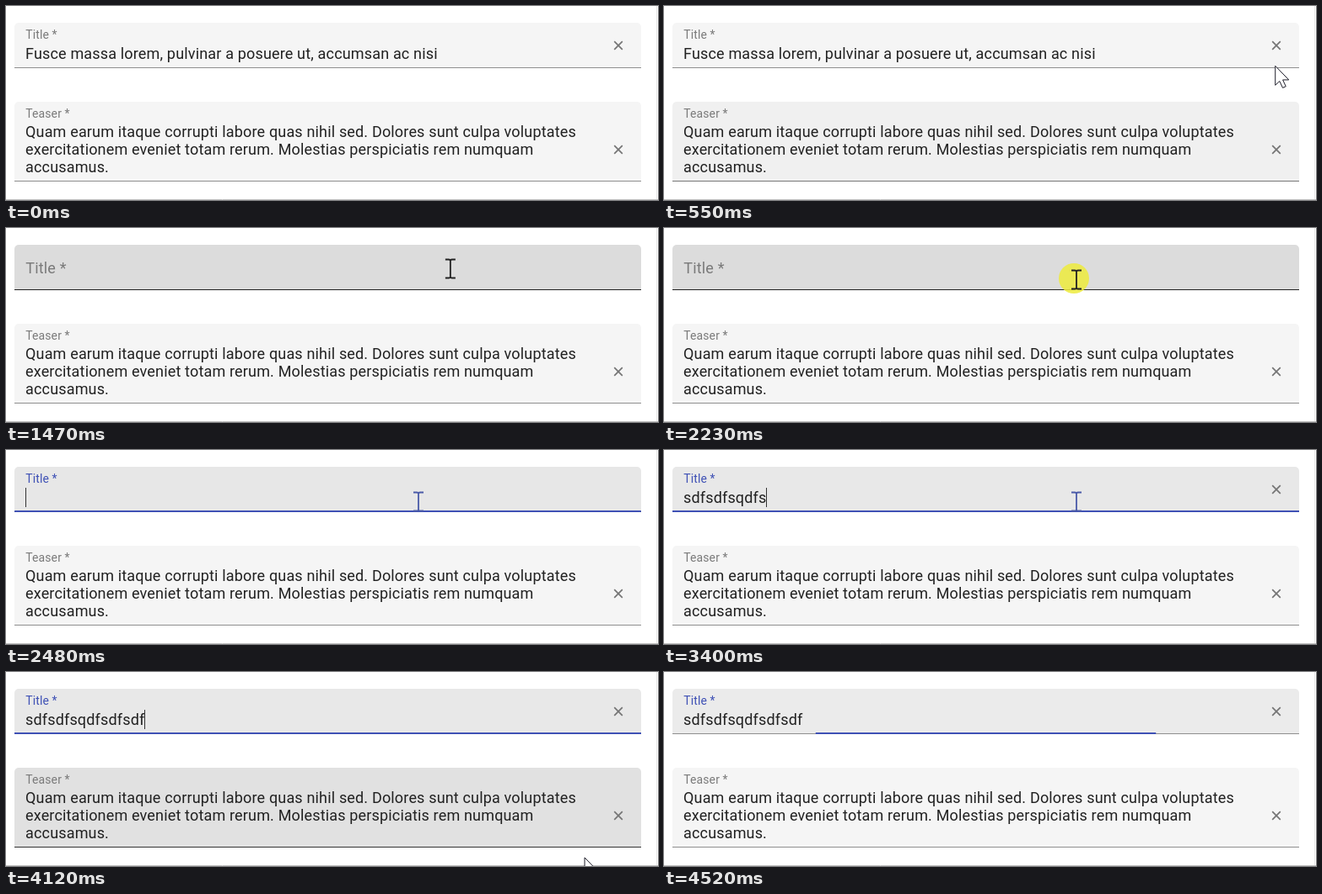
Animation of 773 by 231 pixels, one loop 4570 ms. Source, as an HTML page:

```html
<!DOCTYPE html>
<html lang="en">
<head>
<meta charset="utf-8">
<title>Form fields</title>
<style>
  html, body { margin: 0; width: 100%; height: 100%; overflow: hidden; background: #fff; }
  svg { display: block; }
  text { font: 18px Roboto, sans-serif; letter-spacing: .165px; fill: #212121; white-space: pre; }
  .label { fill: #7a7a7a; }
  .clear { stroke: #757575; stroke-width: 1.7; fill: none; }
</style>
</head>
<body>
<svg width="773" height="231" viewBox="0 0 773 231">
  <path d="M771.5 0V230" stroke="#e6e6e6"/>
  <path d="M0 230.5H773" stroke="#c2c2c2"/>

  <path id="titleBox" d="M10 74V25a5 5 0 0 1 5-5H748a5 5 0 0 1 5 5V74Z"/>
  <rect id="titleLine" x="10" y="73" width="743" height="1"/>
  <rect id="ripple" y="72" height="2" fill="#3f51b5"/>
  <text id="titleLabel" class="label">Title *</text>
  <text id="value" x="23" y="63"></text>
  <rect id="caret" y="45" width="1" height="23" fill="#333"/>
  <path id="clear" class="clear" d="M721.2 42.2l9.6 9.6m0-9.6l-9.6 9.6"/>

  <path id="teaserBox" d="M10 209V119a5 5 0 0 1 5-5H748a5 5 0 0 1 5 5V209Z"/>
  <rect id="teaserLine" x="10" y="208" width="743" height="1"/>
  <text class="label" transform="translate(23.3 133) scale(.775)">Teaser *</text>
  <text x="23" y="156">Quam earum itaque corrupti labore quas nihil sed. Dolores sunt culpa voluptates</text>
  <text x="23" y="177">exercitationem eveniet totam rerum. Molestias perspiciatis rem numquam</text>
  <text x="23" y="198">accusamus.</text>
  <path class="clear" d="M721.2 166.2l9.6 9.6m0-9.6l-9.6 9.6"/>

  <g id="pointer">
    <circle id="halo" cx="-3" cy="-1" r="18" fill="#eeeb3c" opacity=".85"/>
    <path id="arrow" d="M.5 .5V23.5L5.6 18.7L9.3 26.6L13 24.9L9.4 17.1H16.5Z" fill="#fff" stroke="#1c1c28"/>
    <path id="hand" d="M-2 13V2a2 2 0 0 1 4 0V8q2-1.6 3.5 .4q2-1.2 3.2 .6q2.3-.6 2.3 2V15q0 4-2.5 7H-1.5q-1.5-4-4.5-7.5q-.5-3 2-2.5Z" fill="#fff" stroke="#1c1c28"/>
    <path id="beam" d="M-6 -10.5H-2Q0 -10.5 0 -9Q0 -10.5 2 -10.5H6M0 -9V10M-6 11.5H-2Q0 11.5 0 10Q0 11.5 2 11.5H6" fill="none" stroke-width="1.8"/>
  </g>
</svg>
<script>
const LOOP = 4570, CLEARED = 1120, CLICK = 2230, FOCUS = 2255, BLUR = 4440;
const $ = id => document.getElementById(id);
const set = (id, attrs) => { for (const k in attrs) $(id).setAttribute(k, attrs[k]); };
const show = (id, on) => set(id, { visibility: on ? 'visible' : 'hidden' });
const prog = (t, start, dur) => Math.min(1, Math.max(0, (t - start) / dur));
const ease = (p, n) => 1 - (1 - p) ** n;
const mix = (a, b, p) => a + (b - a) * p;
const gray = v => `rgb(${v},${v},${v})`;
const fade = (t, on, off) =>
  ease(prog(t, on, 240), 2) * (1 - ease(prog(t, off, 240), 2));

const filled = 'Fusce massa lorem, pulvinar a posuere ut, accumsan ac nisi';
const typed = 'sdfsdfsqdfsdfsdf';

// One burst of keystrokes, 40 ms apart
const burst = (t, start, size) =>
  t < start ? 0 : Math.min(size, 1 + Math.floor((t - start) / 40));
const typedCount = t => burst(t, 2790, 6) + burst(t, 3140, 4) + burst(t, 3400, 6);

// The pointer comes to the clear button, goes to the text, clicks, then leaves
function pointerAt(t) {
  const enter = ease(prog(t, 230, 490), 2);
  const toText = ease(prog(t, 1200, 300), 2);
  const settle = prog(t, 1700, 330);
  const leave = prog(t, 3650, 520) ** 1.5;
  return [
    726 - 2 * enter - 199 * toText - 36 * settle + 228 * leave,
    240 - 192 * enter + 13 * settle + 12 * Math.sin(Math.PI * settle) + 185 * leave
  ];
}

function cursorAt(t, x, y) {
  const inTitle = y > 40 && y < 74, inTeaser = y > 137 && y < 200;
  if (x < 700 && (inTitle || inTeaser)) return 'beam';
  return inTitle && t >= 800 ? 'hand' : 'arrow';
}

function drawTitle(t) {
  const focused = t > FOCUS && t < BLUR;
  let level = mix(245, 220, fade(t, 555, LOOP));
  if (t > FOCUS) level = mix(220, 232, prog(t, FOCUS, 250));
  if (t > BLUR) level = mix(232, 245, ease(prog(t, BLUR, 640), 2));
  set('titleBox', { fill: gray(level) });
  set('titleLine', { fill: gray(t < BLUR ? mix(142, 32, fade(t, 555, LOOP)) : 142) });

  const grow = ease(prog(t, FOCUS, 250), 3) - ease(prog(t, BLUR, 145), 3);
  const width = 743 * mix(.5, 1, grow);
  set('ripple', { x: 381.5 - width / 2, width, opacity: prog(t, FOCUS, 120) });

  const down = ease(prog(t, CLEARED, 350), 3) - ease(prog(t, FOCUS, 270), 3);
  set('titleLabel', {
    transform: `translate(23.3 ${mix(39, 54, down)}) scale(${mix(.775, 1, down)})`,
    style: t > FOCUS ? 'fill:#3f51b5' : ''
  });

  const text = t < CLEARED ? filled : typed.slice(0, typedCount(t));
  if ($('value').textContent !== text) $('value').textContent = text;
  const end = text ? $('value').getComputedTextLength() : 0;
  set('caret', { x: Math.floor(23.5 + end) });
  show('caret', focused);
  show('clear', text);
}

function drawTeaser(t) {
  const hover = fade(t, 250, 420) + fade(t, 3876, 4098);
  set('teaserBox', { fill: gray(mix(245, 220, hover)) });
  set('teaserLine', { fill: gray(mix(142, 32, hover)) });
}

function drawPointer(t) {
  const [x, y] = pointerAt(t), kind = cursorAt(t, x, y);
  for (const name of ['arrow', 'hand', 'beam']) show(name, t >= 250 && kind === name);
  show('halo', [CLEARED, CLICK].some(at => t >= at && t < at + 100));
  set('beam', { stroke: t > FOCUS ? '#4a5aa8' : '#222' });
  set('pointer', { transform: `translate(${x} ${y})` });
}

function draw(t) {
  drawTitle(t);
  drawTeaser(t);
  drawPointer(t);
}

const start = performance.now();
function tick() {
  draw((performance.now() - start) % LOOP);
  requestAnimationFrame(tick);
}
draw(0);
requestAnimationFrame(tick);
</script>
</body>
</html>
```
